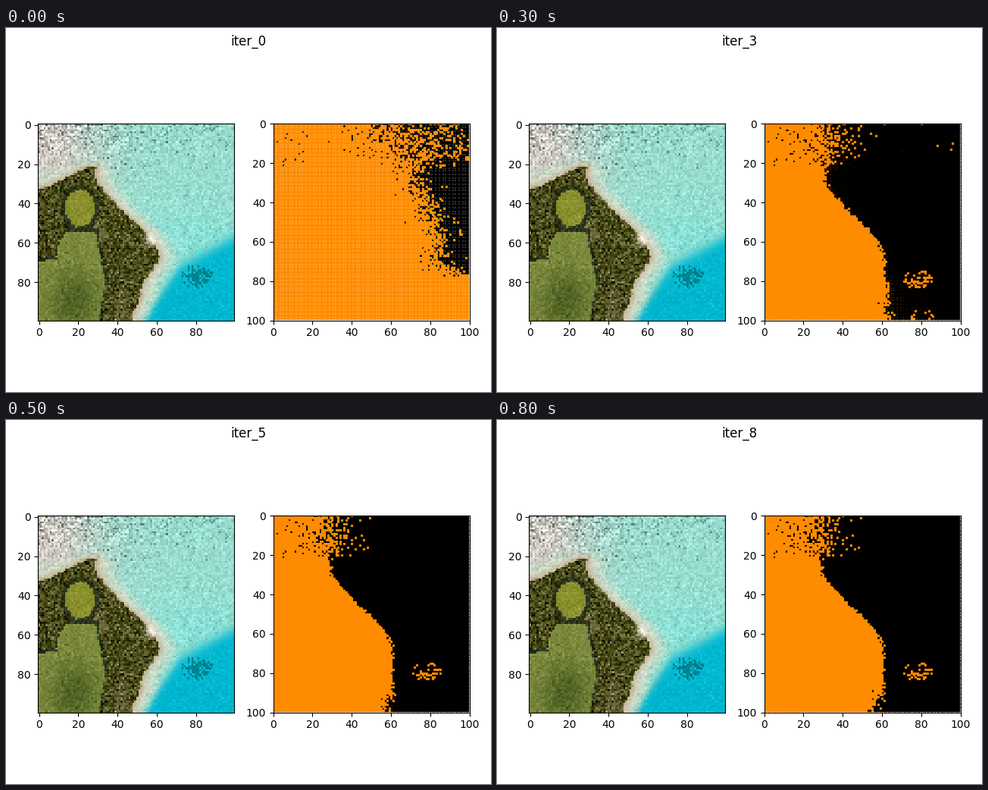
Write a matplotlib script that moves like this. It is 640x480 px and loops after 900 ms.

```python
import numpy as np
import matplotlib.pyplot as plt
from matplotlib.animation import FuncAnimation
from matplotlib.path import Path

W, H, DPI = 640, 480, 100
N, STEPS = 100, 9
SIDE, TOP = 259.08, 126.45

rng = np.random.default_rng(4)
gx, gy = np.meshgrid(np.arange(N), np.arange(N))
grain = rng.normal(size=(N, N))
noise = np.clip(rng.logistic(size=(N, N)), -5, 5)
chance = rng.random((N, N))


def smooth(v, start, end):
    t = np.clip((v - start) / (end - start), 0, 1)
    return t * t * (3 - 2 * t)


def blob(cx, cy, rx, ry):
    return ((gx - cx) / rx) ** 2 + ((gy - cy) / ry) ** 2


# where water meets land, as x for each row
shore = 29 + 32 * smooth(gy, 24, 68) - 5 * smooth(gy, 85, 100)


# ---- coastal picture -------------------------------------------------
def coast():
    pic = np.full((N, N, 3), (152.0, 221, 207))
    amp = 11 + 24 * np.exp(-blob(10, 2, 42, 17))

    def tint(color, weight, noise_amp=None):
        w = np.clip(weight, 0, 1)
        pic[:] += (np.array(color) - pic) * w[..., None]
        if noise_amp is not None:
            amp[:] += (noise_amp - amp) * w

    # distance inland: from the east coast and from the north coast
    east = shore - 9 * smooth(gy, 66, 84) - gx + 0.5 * grain
    north = gy - 32 + 10.5 * smooth(gx, 0, 28) + 0.3 * grain
    inland = np.minimum(east, north)
    kink = gy - 72 - (72 - gx) * np.where(gx < 72, 1.4, 0.54)

    # water
    tint((206, 202, 194), 1.1 * np.exp(-blob(2, 12, 32, 28)))
    tint((128, 226, 218), 0.6 * np.exp(-blob(80, 58, 24, 16)))
    tint((0, 183, 208), 1 / (1 + np.exp(-(kink + grain) / 1.6)), 6)
    tint((0, 122, 132), 0.8 * (blob(80, 77, 8, 5) + 0.5 * grain < 0.6))
    flecks = (gy < 30) & (chance < 0.26 * np.exp(-gy / 9) * (1 - gx / 150))
    pic[flecks] *= 0.72

    # beach
    tint((205, 217, 197), 0.95 * np.exp(-(inland / 8) ** 4) * smooth(gy, 16, 24), 8)
    tint((203, 188, 160), np.exp(-((inland + 0.8) / 1.4) ** 2), 10)

    # woods, hedges and fields
    tint((72, 74, 24), inland > 0, 31)
    tint((132, 122, 78), 0.9 * np.exp(-blob(30, 56, 3, 6)), 14)
    meadow = blob(21, 42.5, 7.5, 9.5)
    field = Path([(11, 58), (15, 54), (29, 55), (34, 80),
                  (30, 103), (-3, 103), (-3, 70), (9, 68)])

    def in_field(dx, dy):
        pts = np.column_stack([(gx - dx + 0.3 * grain).ravel(), (gy - dy).ravel()])
        return field.contains_points(pts).reshape(N, N)

    tint((40, 49, 29), 0.9 * ((meadow < 1.6) | in_field(1, -2)), 12)
    tint((139, 145, 46), meadow + 0.1 * grain < 1, 8)
    tint((126, 139, 62), in_field(0, 0), 10)
    tint((82, 101, 38), in_field(0, 0) * 1.1 * np.exp(-blob(18, 89, 12, 14)))
    tint((120, 112, 76), 0.8 * np.exp(-blob(42, 92, 3, 8)), 26)
    tint((255, 246, 234), np.exp(-blob(57, 58.5, 2.6, 3)))
    return np.clip(pic + (grain * amp)[..., None], 0, 255).astype(np.uint8)


# ---- two-class labels ------------------------------------------------
def black_cells(k):
    # the edge starts far out in the water and closes in on the shore
    gap = 34 + 10 * np.sin(np.pi * gy / 50) + 30 * smooth(gy, 70, 84)
    rate = 0.2 + 0.4 * np.abs(1 - gy / 55) ** 1.5
    spread = (0.35 + 3 * 0.2 ** k + 5.5 * (1 - smooth(gy, 14, 24))
              + 0.9 * smooth(gy, 82, 92))
    black = gx + 0.5 + noise * spread > shore + gap * rate ** k

    # patches that lag behind: reef, sand bar, southern shoal, northern water
    for patch, density in ((blob(78, 79, 7.5, 4.8), 0.32 + 0.5 ** k),
                           (blob(64.5, 55, 7, 3.4), 2 - k),
                           (blob(80, 97.5, 7, 4), 0.8 - 0.2 * k),
                           (blob(85, 10, 17, 13), 0.2 * 0.3 ** k)):
        black &= (patch > 1) | (chance > density)

    specks = (gx < 19) & (gy < 22) & (chance > 0.965)
    return black | specks


# ---- figure ----------------------------------------------------------
fig = plt.figure(figsize=(W / DPI, H / DPI), dpi=DPI)


def panel(left):
    return fig.add_axes([left / W, 1 - (TOP + SIDE) / H, SIDE / W, SIDE / H])


photo, labels = panel(42.36), panel(352.68)
photo.imshow(coast(), aspect="auto", interpolation="nearest")
photo.set(xticks=range(0, N, 20), yticks=range(0, N, 20))
labels.set(xlim=(0, N), ylim=(N, 0),
           xticks=range(0, N + 1, 20), yticks=range(0, N + 1, 20))
title = fig.suptitle("iter_0", y=0.98 + 1 / H)

# every step is plotted over the ones before it
layers = []
for k in range(STEPS):
    black = black_cells(k)
    layers.append([labels.scatter(gx[m], gy[m], s=2, color=c)
                   for m, c in ((black, "black"), (~black, "darkorange"))])


def update(k):
    title.set_text(f"iter_{k}")
    for i, layer in enumerate(layers):
        for dots in layer:
            dots.set_visible(i <= k)


anim = FuncAnimation(fig, update, frames=STEPS, interval=100, repeat=True,
                     repeat_delay=0, blit=False)
plt.show()
```
